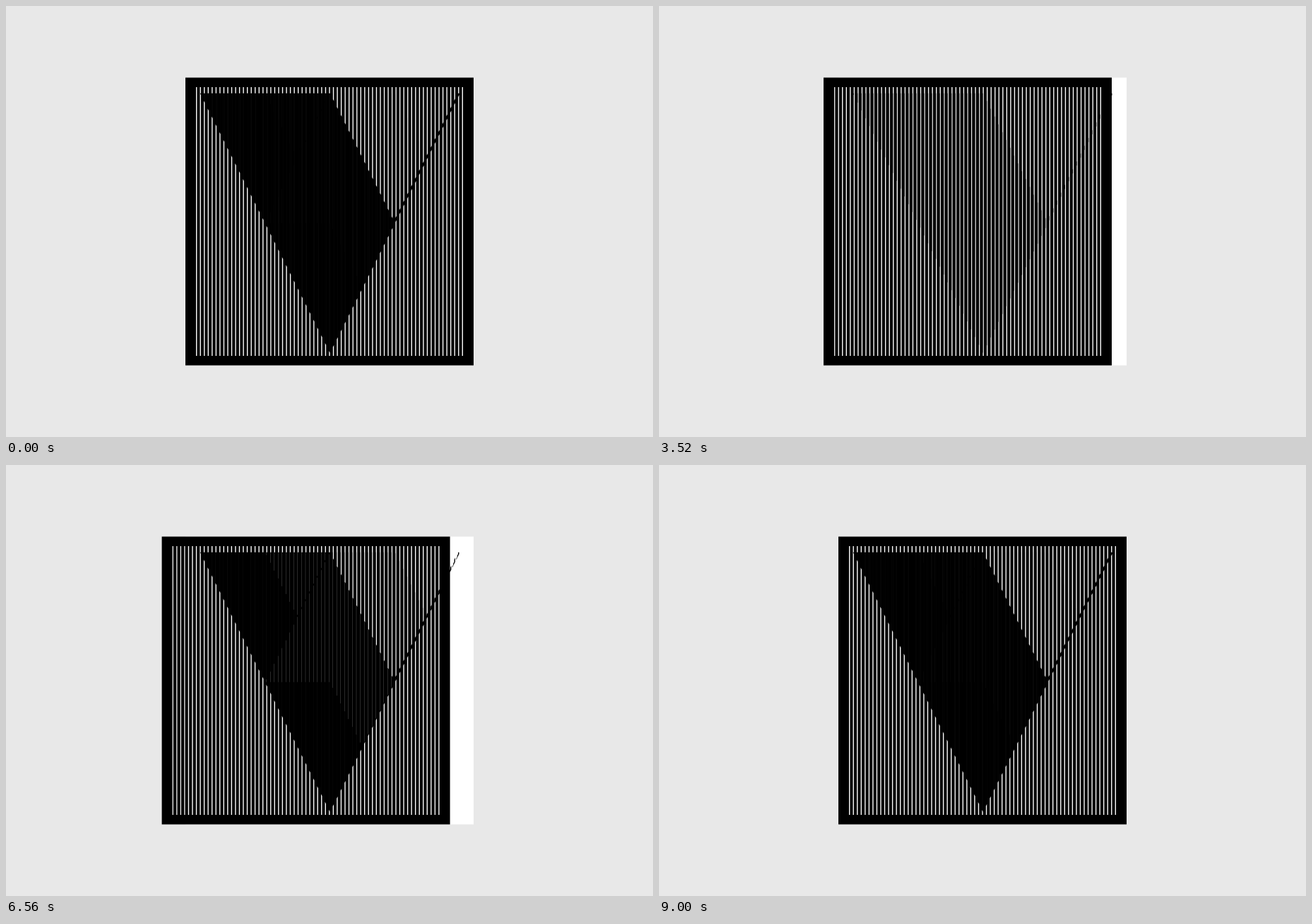
Recreate the animation shown at these times as an HTML page with a canvas. Size 916 by 611 pixels, loop 10000 ms.

```html
<!DOCTYPE html>
<html lang="en">
<head>
<meta charset="utf-8">
<title>Barrier grid</title>
<style>
  html, body { margin: 0; width: 100%; height: 100%; overflow: hidden; background: #e8e8e8; }
  canvas { display: block; }
</style>
</head>
<body>
<canvas id="stage" width="916" height="611"></canvas>
<script>
const LOOP = 10000, STEP = 40;
const BG = '#e8e8e8';
const CARD = { x: 254, y: 101.5, size: 408 };
const PAD = 13.6;
const PITCH = 72 / 13, SLIT = PITCH / 4, SLITS = 69, FIRST = 269;
const TRI = { x: 274.7, y: 123.7, size: 368 };
// Drawn area, oversampled horizontally so that the fine slits stay clean
const VIEW = { x: 210, y: 100, w: 460, h: 412 };
const OVER = 8;

const stage = document.getElementById('stage').getContext('2d');

function layer(scale) {
  const canvas = document.createElement('canvas');
  canvas.width = VIEW.w * scale;
  canvas.height = VIEW.h;
  const ctx = canvas.getContext('2d');
  ctx.setTransform(scale, 0, 0, 1, -VIEW.x * scale, -VIEW.y);
  return ctx;
}

function polygon(ctx, x, y, s, points) {
  points.forEach(([u, v]) => ctx.lineTo(x + u * s, y + v * s));
  ctx.closePath();
}

const FACE = [[0, 0], [.5, 0], [.75, .5], [.5, 1]];
const EDGE = [[.992, 0], [1, 0], [.75, .5], [.742, .5]];

// Inverted pyramid with n rows, cut into every fourth strip
function pyramid(ctx, phase, n) {
  const s = TRI.size / n;
  ctx.save();
  ctx.beginPath();
  for (let i = 0; i <= SLITS; i++) {
    ctx.rect(FIRST + i * PITCH - phase * SLIT, TRI.y - 5, SLIT, TRI.size + 10);
  }
  ctx.clip();
  ctx.fillStyle = '#000';
  for (let row = 0; row < n; row++) {
    for (let col = 0; col < n - row; col++) {
      const x = TRI.x + (col + row / 2) * s, y = TRI.y + row * s;
      for (const shape of [FACE, EDGE]) {
        ctx.beginPath();
        polygon(ctx, x, y, s, shape);
        ctx.fill();
      }
    }
  }
  ctx.restore();
}

function drawCard(ctx) {
  ctx.fillStyle = BG;
  ctx.fillRect(VIEW.x, VIEW.y, VIEW.w, VIEW.h);
  ctx.fillStyle = '#fff';
  ctx.fillRect(CARD.x, CARD.y, CARD.size, CARD.size);
  [1, 2, 4].forEach((n, phase) => pyramid(ctx, phase, n));
}

function drawGrid(ctx, dx) {
  const { x, y, size } = CARD;
  ctx.fillStyle = '#000';
  ctx.beginPath();
  ctx.rect(x + dx, y, size, size);
  for (let i = 0; i < SLITS; i++) {
    ctx.rect(FIRST + i * PITCH + dx, y + PAD, SLIT, size - 2 * PAD);
  }
  ctx.fill('evenodd');
}

const card = layer(OVER);
drawCard(card);
const layers = [OVER, OVER / 2, OVER / 4].map(layer);

const sine = u => (1 - Math.cos(Math.PI * u)) / 2;

// cubic-bezier(.25, .1, .25, 1)
function ease(u) {
  const curve = (a, b, s) => 3 * a * s * (1 - s) ** 2 + 3 * b * s * s * (1 - s) + s ** 3;
  let lo = 0, hi = 1;
  for (let i = 0; i < 30; i++) {
    const mid = (lo + hi) / 2;
    if (curve(.25, .25, mid) < u) lo = mid; else hi = mid;
  }
  return curve(.1, 1, (lo + hi) / 2);
}

const MOVES = [
  { from: 0, to: 2000, by: -18, fn: ease },
  { from: 2960, to: 5040, by: -18, fn: sine },
  { from: 6040, to: 9040, by: 36, fn: sine }
];

function offset(t) {
  return MOVES.reduce((sum, m) => {
    const u = Math.min(1, Math.max(0, (t - m.from) / (m.to - m.from)));
    return sum + (u === 0 ? 0 : u === 1 ? m.by : m.by * m.fn(u));
  }, 0);
}

function render(t) {
  const top = layers[0];
  top.save();
  top.resetTransform();
  top.drawImage(card.canvas, 0, 0);
  top.restore();
  drawGrid(top, offset(t));

  // Halve the width step by step: each pass averages two columns
  for (let i = 1; i < layers.length; i++) {
    layers[i].drawImage(layers[i - 1].canvas, VIEW.x, VIEW.y, VIEW.w, VIEW.h);
  }
  stage.drawImage(layers[layers.length - 1].canvas, VIEW.x, VIEW.y, VIEW.w, VIEW.h);
}

stage.fillStyle = BG;
stage.fillRect(0, 0, 916, 611);

const start = performance.now();
let shown = -1;

function tick() {
  const t = Math.floor(((performance.now() - start + 1) % LOOP) / STEP) * STEP;
  if (t !== shown) render(shown = t);
  requestAnimationFrame(tick);
}
tick();
</script>
</body>
</html>
```
